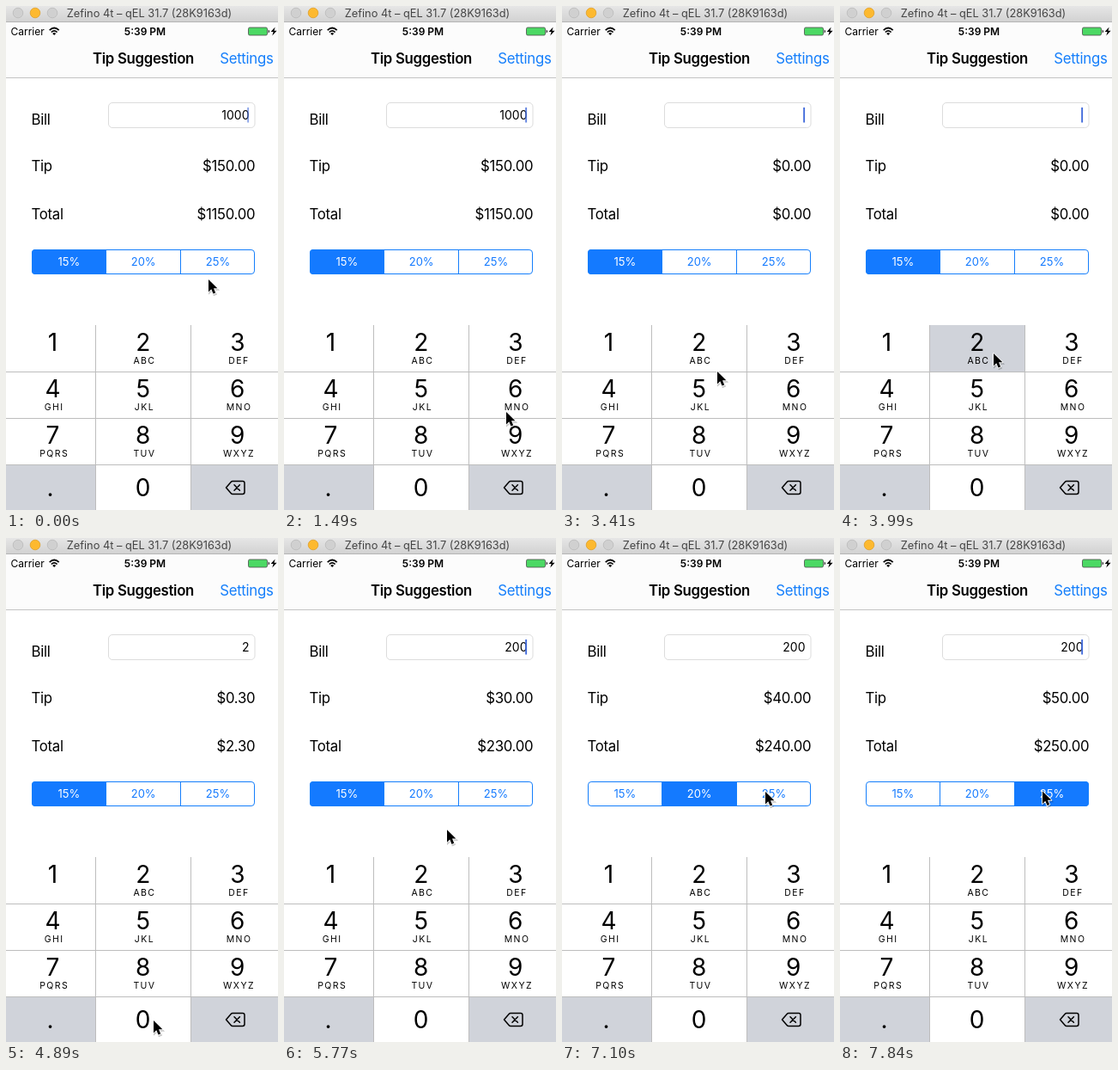
Recreate the animation shown at these times as an HTML page. Size 317 by 586 pixels, loop 7990 ms.

```html
<!DOCTYPE html>
<html lang="en">
<head>
<meta charset="utf-8">
<title>Tip Suggestion</title>
<style>
  html, body { margin: 0; width: 100%; height: 100%; overflow: hidden; background: #fff; }
  svg { display: block; width: 100%; height: 100%; }
  text { font-family: Inter, "Liberation Sans", Arial, sans-serif; fill: #000; }
  .title { font-size: 12.8px; fill: #454545; }
  .status { font-size: 12px; }
  .bold { font-weight: 600; }
  .body { font-size: 16.8px; letter-spacing: -.3px; }
  .link { fill: #147efb; }
  .input { font-size: 14px; }
  .seg { font-size: 13px; }
  .digit { font-size: 28px; }
  .letters { font-size: 10.5px; letter-spacing: 1.4px; }
  .mid { text-anchor: middle; }
  .end { text-anchor: end; }
</style>
</head>
<body>
<svg viewBox="0 0 317 586">
  <defs>
    <linearGradient id="bar" x2="0" y2="1">
      <stop stop-color="#e6e6e6"/><stop offset="1" stop-color="#d2d2d2"/>
    </linearGradient>
    <clipPath id="pill"><rect x="30" y="283" width="260" height="29" rx="4"/></clipPath>
  </defs>
  <rect width="317" height="586" fill="#fff"/>

  <rect width="317" height="18" fill="url(#bar)"/>
  <rect y="18" width="317" height="1" fill="#b4b4b4"/>
  <g stroke-width=".8">
    <circle cx="14" cy="8" r="5.8" fill="#d0d0d0" stroke="#bababa"/>
    <circle cx="34" cy="8" r="5.8" fill="#fdb92f" stroke="#dfa02b"/>
    <circle cx="54" cy="8" r="5.8" fill="#d0d0d0" stroke="#bababa"/>
  </g>
  <text class="title mid" x="167" y="13">Zefino 4t – qEL 31.7 (28K9163d)</text>

  <rect y="19" width="317" height="64" fill="#fcfcfc"/>
  <rect y="83" width="317" height="1" fill="#c3c3c3"/>
  <text class="status" x="5.5" y="33.5">Carrier</text>
  <g fill="none" stroke="#000" stroke-width="1.7">
    <path d="M50.7 28.2Q56.2 22.8 61.7 28.2M52.8 30.5Q56.2 27.2 59.6 30.5"/>
    <path d="M54.2 31.9Q56.2 30.2 58.2 31.9L56.2 34Z" fill="#000" stroke="none"/>
  </g>
  <text class="status bold mid" x="162" y="33.5">5:39 PM</text>
  <rect x="282.5" y="25" width="22" height="9" rx="1.6" fill="#4cd964" stroke="#4a4a4a" stroke-width=".8"/>
  <path d="M305.6 27.6q1.5 .3 1.5 1.9t-1.5 1.9z" fill="#333"/>
  <path d="M313.6 24.5L308.6 30H311.6L310.3 34.5L315.6 28.8H312.5Z"/>
  <text class="body bold mid" x="160" y="67">Tip Suggestion</text>
  <text class="body link end" x="311.5" y="67">Settings</text>

  <text class="body" x="29.5" y="137.5">Bill</text>
  <text class="body" x="29.5" y="191.5">Tip</text>
  <text class="body" x="29.5" y="247.5">Total</text>
  <rect x="119.5" y="112.5" width="170.5" height="29" rx="4.5" fill="#fff" stroke="#dcdcdc"/>
  <text class="input end" id="bill" x="283.5" y="131.7"></text>
  <rect id="caret" x="281.2" y="118" width="1.9" height="17.5" fill="#426bdb"/>
  <text class="body end" id="tip" x="290.3" y="191.5"></text>
  <text class="body end" id="total" x="290.3" y="247.5"></text>

  <g id="segs" clip-path="url(#pill)"></g>
  <rect x="30.5" y="283.5" width="259" height="28" rx="3.6" fill="none" stroke="#147efb"/>
  <path d="M116.5 283V312M203.5 283V312" stroke="#147efb"/>

  <g id="pad"></g>
  <path d="M0 425.5H317M0 479.5H317M0 533.5H317M104.5 371V586M215.5 371V586" stroke="#bdbdbd"/>
  <g fill="none" stroke="#000" stroke-width="1.5" stroke-linejoin="round" stroke-linecap="round">
    <path d="M256.5 560L262.4 553.2Q263 552.5 264 552.5H275.8Q278 552.5 278 554.7V565.3Q278 567.5 275.8 567.5H264Q263 567.5 262.4 566.8Z"/>
    <path d="M266 556.8L272.4 563.2M272.4 556.8L266 563.2"/>
  </g>

  <g id="cursor">
    <path d="M0 0V14.4L3.3 11.3L5.5 16.6L8.2 15.4L6 10.3H10.4Z" transform="translate(.8 1.6)" opacity=".22" stroke="#000" stroke-width="1.6"/>
    <path d="M0 0V14.4L3.3 11.3L5.5 16.6L8.2 15.4L6 10.3H10.4Z" stroke="#fff" stroke-width="1.7" stroke-linejoin="round" paint-order="stroke"/>
  </g>
</svg>
<script>
const LOOP = 7990, STEP = 147.75, LAST = 53;
const BLUE = '#147aff', GRAY = '#d0d3da';
const RATES = [15, 20, 25];
const $ = id => document.getElementById(id);

// All tables below count in ticks of STEP ms.
const PATH = [
  [0, 236, 318], [3, 221, 372], [7, 250, 511], [8, 250, 511], [10, 259, 472],
  [11, 264, 484], [13, 283, 551], [14, 285, 559], [20, 285, 559], [23, 181, 425],
  [25, 179, 404], [30, 179, 404], [33, 172, 561], [36, 172, 561], [38, 186, 363],
  [41, 198, 292], [46, 198, 292], [48, 237, 295], [52, 237, 295], [53, 236, 294.5]
];
const EDITS = [[0, '1000'], [14, '100'], [16, '10'], [18, '1'], [20, ''],
               [28, '2'], [35, '20'], [37, '200']];
const PRESSES = [['del', 14, 15], ['del', 16, 17], ['del', 18, 21],
                 ['2', 27, 28], ['0', 34, 35], ['0', 36, 37]];
const PICKS = [[45, 1], [50, 2]];

function add(parent, tag, attrs, text = '') {
  const el = document.createElementNS('http://www.w3.org/2000/svg', tag);
  for (const k in attrs) el.setAttribute(k, attrs[k]);
  el.textContent = text;
  return parent.appendChild(el);
}

const segs = RATES.map((rate, i) => ({
  fill: add($('segs'), 'rect', { x: [30, 116.5, 203.5][i], y: 283, width: 87, height: 29, fill: BLUE }),
  label: add($('segs'), 'text', { class: 'seg mid', x: [73.3, 160.2, 247][i], y: 302.3 }, rate + '%')
}));

const keys = {};
['1', '2 ABC', '3 DEF', '4 GHI', '5 JKL', '6 MNO', '7 PQRS', '8 TUV', '9 WXYZ', '.', '0', 'del']
  .forEach((key, i) => {
    const [name, letters] = key.split(' ');
    const col = i % 3, row = Math.floor(i / 3);
    const x = [55, 160.2, 270.3][col], y = 371 + row * 54;
    const left = [0, 105, 216][col], right = [104, 215, 317][col];
    const rest = name === '.' || name === 'del' ? GRAY : '#fff';
    const el = add($('pad'), 'rect', { x: left, y, width: right - left, height: 54 });
    keys[name] = { el, rest, down: rest === GRAY ? '#fff' : GRAY };
    if (name !== 'del')
      add($('pad'), 'text', { class: 'digit mid', x: name === '.' ? 51.5 : x - .5, y: row === 3 ? 570 : y + 30 }, name);
    if (letters)
      add($('pad'), 'text', { class: 'letters mid', x: x + 1.2, y: y + 45 }, letters);
  });

function cursorAt(k) {
  const i = Math.max(1, PATH.findIndex(p => p[0] >= k));
  const [a, ax, ay] = PATH[i - 1], [b, bx, by] = PATH[i];
  const u = (k - a) / (b - a);
  return [ax + (bx - ax) * u, ay + (by - ay) * u];
}

// The caret stays solid after an edit, then blinks once a second.
function caretAlpha(age) {
  const p = age % 1;
  if (p >= .5) return 0;
  return Math.min(1, .6 + (.5 - p) * 10, age < 1 ? 1 : .6 + p * 15);
}

function segAlpha(i, k) {
  let from = 0, now = 0, start = 0;
  for (const [tick, to] of PICKS) {
    if (k === tick - 1 && i === to) return .2;
    if (k >= tick) { from = now; now = to; start = tick; }
  }
  const mix = start && k === start;
  if (i === now) return mix ? .88 : 1;
  return mix && i === from ? .23 : 0;
}

const money = v => '$' + v.toFixed(2);

function draw(k) {
  const [x, y] = cursorAt(k);
  $('cursor').setAttribute('transform', `translate(${x.toFixed(1)} ${y.toFixed(1)})`);

  const [tick, bill] = EDITS.filter(e => e[0] <= k).pop();
  const picked = PICKS.filter(p => p[0] <= k).pop();
  const tip = bill * RATES[picked ? picked[1] : 0] / 100;
  $('bill').textContent = bill;
  $('tip').textContent = money(tip);
  $('total').textContent = money(+bill + tip);
  $('caret').setAttribute('opacity', caretAlpha((k - tick) * STEP / 1000 + (tick ? 0 : 1)));

  segs.forEach(({ fill, label }, i) => {
    const a = segAlpha(i, k), mix = (c, w) => Math.round(c + (255 - c) * w);
    const w = a > .5 ? a * a : a;
    fill.setAttribute('opacity', a);
    label.style.fill = `rgb(${mix(20, w)},${mix(122, w)},255)`;
  });

  for (const name in keys) {
    const { el, rest, down } = keys[name];
    const held = PRESSES.some(([n, a, b]) => n === name && k >= a && k < b);
    el.setAttribute('fill', held ? down : rest);
  }
}

let shown = -1;
function frame() {
  const k = Math.min(LAST, Math.floor(performance.now() % LOOP / STEP));
  if (k !== shown) draw(shown = k);
  requestAnimationFrame(frame);
}
frame();
</script>
</body>
</html>
```
